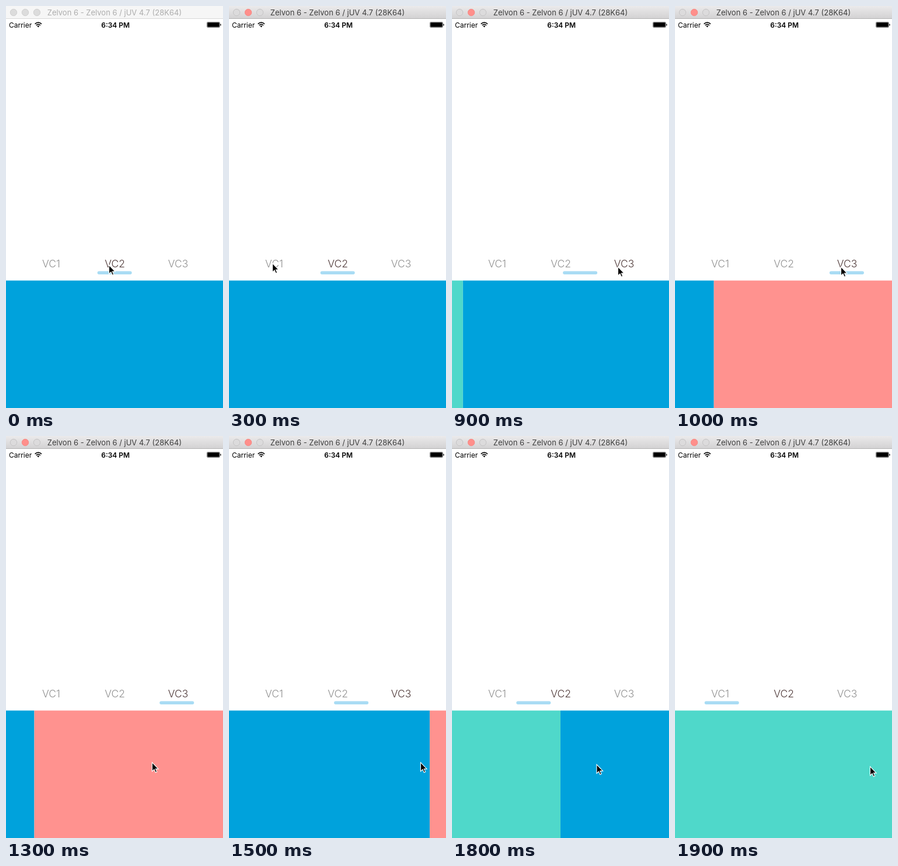
These frames come from a looping animation (372 px wide and 686 px high, 2 s). An HTML page:

```html
<!DOCTYPE html>
<html lang="en">
<head>
<meta charset="utf-8">
<title>Tab pager</title>
<style>
  html, body { margin: 0; width: 100%; height: 100%; overflow: hidden; background: #fff; }
  svg { display: block; width: 372px; height: 686px; }
  text { font-family: Inter, Roboto, sans-serif; }
  .tab { font-size: 17.5px; font-weight: 300; text-anchor: middle; fill: #929292; }
  .tab.on { fill: #503b3a; }
  .bar { fill: url(#chrome); }
  .edge { fill: #b4b3b4; }
  .title { font-size: 13px; text-anchor: middle; fill: #3d3d3d; }
  .light { fill: #dcdbdc; stroke: #c6c5c6; }
  .close { fill: #ff8f8b; stroke: #f68a86; }
  .idle .bar { fill: #f6f6f6; }
  .idle .edge { fill: #d9d9d9; }
  .idle .title { fill: #adadad; }
  .idle .light { fill: #dcdcdc; stroke: #d0d0d0; }
</style>
</head>
<body>
<svg viewBox="0 0 372 686">
  <defs>
    <linearGradient id="chrome" x2="0" y2="1">
      <stop stop-color="#ebeaeb"/><stop offset="1" stop-color="#d3d2d3"/>
    </linearGradient>
  </defs>
  <rect width="372" height="686" fill="#fff"/>

  <g id="window">
    <rect class="bar" width="372" height="21"/>
    <rect class="edge" y="21" width="372" height="1"/>
    <circle class="light" cx="13" cy="11" r="5.7"/>
    <circle class="light close" cx="33" cy="11" r="5.7"/>
    <circle class="light" cx="53" cy="11" r="5.7"/>
    <text class="title" x="186" y="16">Zelvon 6 - Zelvon 6 / jUV 4.7 (28K64)</text>
  </g>

  <g font-size="12">
    <text x="5" y="36.5">Carrier</text>
    <text x="187.7" y="36.5" font-weight="600" text-anchor="middle">6:34 PM</text>
  </g>
  <g fill="none" stroke="#000" stroke-width="1.6">
    <path d="M49.6 30.6Q55.3 25.8 61 30.6M51.6 33Q55.3 29.9 59 33"/>
    <path d="M53.3 34.2Q55.3 32.6 57.3 34.2L55.3 36.4Z" fill="#000" stroke="none"/>
  </g>
  <rect x="344.5" y="27.5" width="22" height="9" rx="1.5" fill="none" stroke="#000" stroke-width=".5"/>
  <rect x="345.3" y="28.3" width="20.4" height="7.5" rx=".8"/>
  <rect x="367.3" y="30.5" width="1.3" height="3" rx=".6"/>

  <rect id="underline" y="452.5" width="59" height="5.5" rx="2.7" fill="#a9dcf4"/>
  <text class="tab" x="77.5" y="446">VC1</text>
  <text class="tab" x="186.7" y="446">VC2</text>
  <text class="tab" x="295" y="446">VC3</text>

  <g id="pages">
    <rect y="468.5" width="372" height="218" fill="#4fd8ca"/>
    <rect x="372" y="468.5" width="372" height="218" fill="#00a2dc"/>
    <rect x="744" y="468.5" width="372" height="218" fill="#ff928f"/>
  </g>
  <path id="cursor" d="M0 0V15.2L3.5 12L5.8 17.2L8.2 16.2L6 11.1H10.6Z" stroke="#fff" stroke-width="1.1"/>
</svg>
<script>
const LOOP = 2000, STEP = 100, PAGE_WIDTH = 372, TAB_GAP = 108.2;
const $ = id => document.getElementById(id);
const tabs = document.querySelectorAll('.tab');

function draw(now) {
  const t = Math.floor(now % LOOP / STEP) * STEP;

  // Eased progress from 0 to 1 between two times.
  const glide = (from, to) => {
    const p = Math.min(1, Math.max(0, (t - from) / (to - from)));
    return (1 - Math.cos(Math.PI * p)) / 2;
  };

  // Tap the first tab, tap the third, then swipe back twice.
  const page = 1 - glide(300, 500) + 2 * glide(750, 1060) - glide(1220, 1560) - glide(1700, 1900);
  const marker = 1 - glide(300, 500) + 2 * glide(750, 1000) - glide(1275, 1600) - glide(1700, 1920);
  const selected = t < 400 ? 1 : t < 800 ? 0 : t < 1600 ? 2 : 1;

  const swipe = 104 * glide(1200, 1500) - 167 * glide(1500, 1700) + 173 * glide(1700, 1900);
  const x = 176.5 - 102 * glide(0, 300) + 210 * glide(500, 800) - 60 * glide(1000, 1200) + swipe;
  const y = 442 - 3 * glide(0, 300) + 6 * glide(500, 800) + 112 * glide(1000, 1200) + 7 * glide(1700, 1900);

  $('window').setAttribute('class', t < STEP ? 'idle' : '');
  $('pages').setAttribute('transform', `translate(${-page * PAGE_WIDTH} 0)`);
  $('underline').setAttribute('x', 48.5 + marker * TAB_GAP);
  $('cursor').setAttribute('transform', `translate(${x} ${y})`);
  tabs.forEach((tab, i) => tab.classList.toggle('on', i === selected));
}

const start = performance.now();
function tick() {
  draw(performance.now() - start);
  requestAnimationFrame(tick);
}
tick();
</script>
</body>
</html>
```
